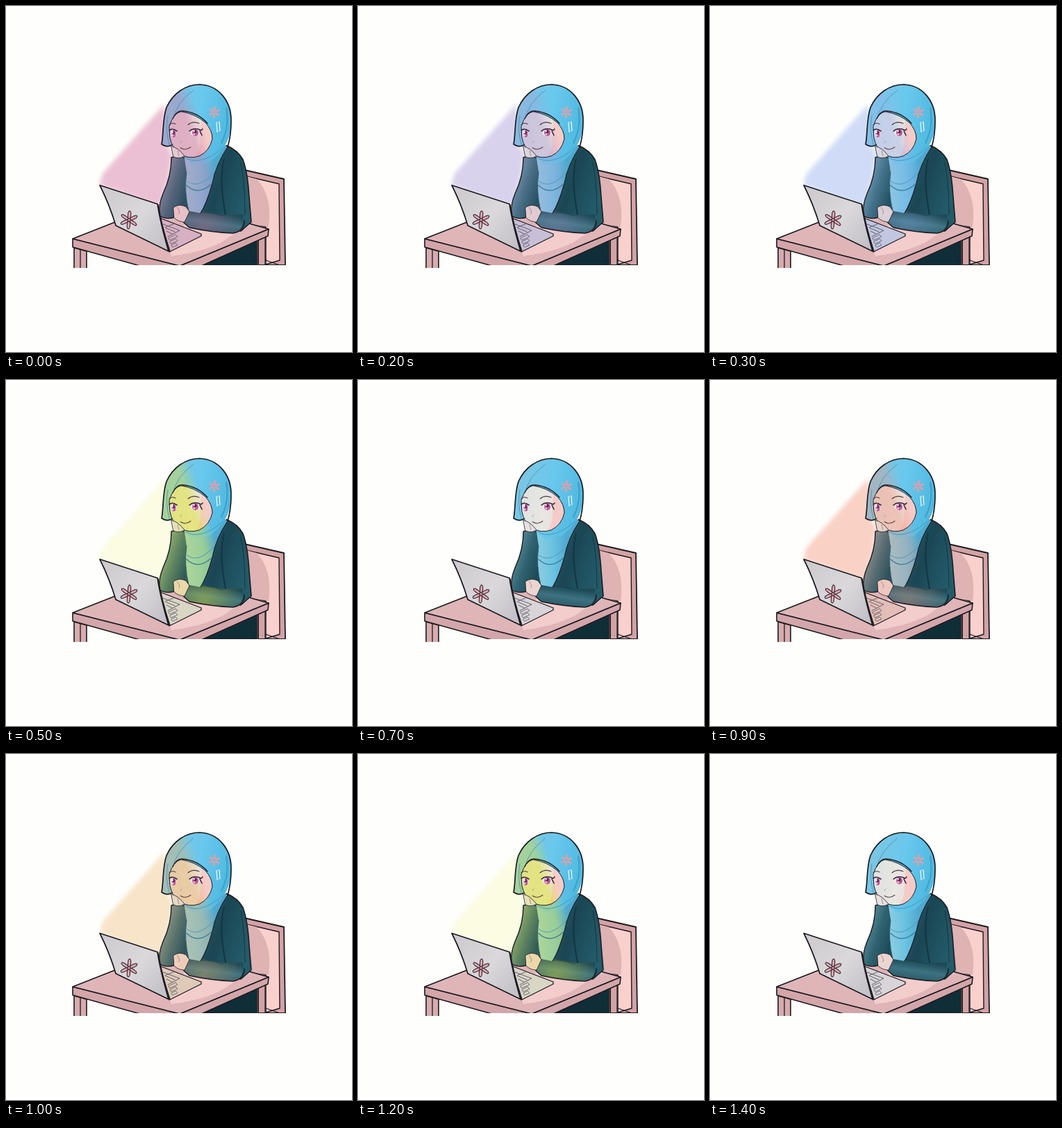
Write an HTML page with a canvas that moves like this. It is 498 by 498 pixels and loops after 1.5 s.

```html
<!DOCTYPE html>
<html lang="en">
<head>
<meta charset="utf-8">
<title>Studying by laptop light</title>
<style>
html, body { margin: 0; width: 100%; height: 100%; overflow: hidden; background: #fefffd; }
canvas { display: block; width: 498px; height: 498px; }
</style>
</head>
<body>
<canvas id="stage" width="498" height="498"></canvas>
<script>
const ctx = document.getElementById('stage').getContext('2d');
const PAPER = '#fefffd', INK = '#1b1a20';
const LOOP = 1500, STEP = 100;

// Screen light: [time, red, green, blue, strength in the air, strength on the figure]
const LIGHTS = [
  [0, 215, 112, 160, .44, .46],
  [300, 150, 176, 240, .44, .4],
  [500, 226, 226, 50, .13, .54],
  [700, 235, 228, 120, 0, 0],
  [900, 245, 150, 125, .44, .44],
  [1200, 226, 226, 50, .13, .54],
  [1400, 235, 228, 120, 0, 0],
  [1500, 215, 112, 160, .44, .46]
];

const shapes = {
  beam: 'M134 258L139 241L228 141L232 200L240 214L234 250L222 290Z',
  chair: 'M343 236L400 249L402 373H363V320L346 300Z',
  chairPanel: 'M346 245L393 256L394 366L374 372V318L352 312Z',
  chairShade: 'M346 245L361 249Q384 274 378 318L352 314Z',
  lap: 'M284 373L361 337V373Z',
  deskTop: 'M96 335L157 311L250 296L346 312L378 321L250 374Z',
  deskLight: 'M238 360Q298 352 322 332L354 314L262 304L236 354Z',
  deskLeft: 'M96 335L250 374V390L96 347Z',
  deskRight: 'M378 321L377 331L250 388V374Z',
  leg: 'M98 348L116 353V380H98Z',
  torso: 'M300 206L318 201Q334 208 341 221Q348 240 350 275L353 311L338 324L262 305L256 240Z',
  propArm: 'M238 218Q248 214 261 220Q266 240 262 268L261 300L243 304Q230 308 221 302Q219 287 226 270Q238 245 238 218Z',
  foreArm: 'M260 299Q272 292 288 296L314 301L341 300Q343 324 327 327Q297 326 264 319L256 312Z',
  chin: 'M238 202Q247 203 257 216Q249 221 241 217Z',
  hand: 'M241 290Q249 284 259 289L264 296L257 311Q248 311 242 305Z',
  drape: 'M256 212L306 195L319 203Q302 228 297 255Q289 284 280 298L263 295Q256 266 260 239Z',
  hood: 'M231 146C240 126 258 113 279 113C306 114 325 137 324 167C324 190 314 210 292 225L268 228L257 218L239 200Q231 204 224 199C227 184 225 163 231 146Z',
  face: 'M235 173Q241 154 252 152Q272 155 287 168Q297 179 297 191Q293 209 278 216Q264 221 249 213Q239 204 236 190Z',
  cheek: 'M281 165Q297 179 297 191Q293 209 278 216L272 218Q282 204 280 186Z',
  lid: 'M135 258L218 285Q222 312 234 353L158 316Q149 286 135 258Z',
  base: 'M221 305L281 328V331L235 354Z'
};
const paths = Object.fromEntries(Object.entries(shapes).map(([name, d]) => [name, new Path2D(d)]));

function shape(name, fill, width = 1.6) {
  ctx.fillStyle = fill;
  ctx.fill(paths[name]);
  if (width) line(paths[name], width);
}

function line(path, width = 1.2, color = INK) {
  ctx.lineWidth = width;
  ctx.strokeStyle = color;
  ctx.stroke(typeof path === 'string' ? new Path2D(path) : path);
}

function addStops(g, colors) {
  colors.forEach((c, i) => g.addColorStop(i / (colors.length - 1), c));
  return g;
}

function gradient(x0, y0, x1, y1, ...colors) {
  return addStops(ctx.createLinearGradient(x0, y0, x1, y1), colors);
}

function glow(x, y, radius, ...colors) {
  return addStops(ctx.createRadialGradient(x, y, 0, x, y, radius), colors);
}

function oval(x, y, rx, ry, fill) {
  ctx.fillStyle = fill;
  ctx.beginPath();
  ctx.ellipse(x, y, rx, ry, 0, 0, Math.PI * 2);
  ctx.fill();
}

function flower(x, y, radius, thin, color, outline) {
  for (let i = 0; i < 6; i++) {
    ctx.save();
    ctx.translate(x, y);
    ctx.rotate(i * Math.PI / 3 + .08);
    oval(0, -radius * .56, radius * thin, radius * .43, color);
    if (outline) {
      ctx.strokeStyle = outline;
      ctx.lineWidth = 1.2;
      ctx.stroke();
    }
    ctx.restore();
  }
}

function lightAt(time) {
  const next = LIGHTS.findIndex(l => l[0] > time);
  const a = LIGHTS[next - 1], b = LIGHTS[next];
  const p = (time - a[0]) / (b[0] - a[0]);
  const [, r, g, bl, air, body] = a.map((v, i) => v + (b[i] - v) * p);
  const tint = alpha => `rgba(${r | 0},${g | 0},${bl | 0},${alpha})`;
  // The lit side of the head ends along a slanted line
  const headTint = alpha => gradient(260, 163, 278, 157, tint(alpha), tint(0));
  return { tint, headTint, air, body };
}

function drawChair() {
  shape('chair', '#d3a2a4', 1.8);
  shape('chairPanel', '#f9d0cc', 1.4);
  shape('chairShade', '#dfb3b3', 0);
  line('M373 319V373M374 366L394 373', 1.3);
}

function drawDesk() {
  shape('lap', '#102e38');
  shape('leg', '#d8abae');
  line('M107 351V377', 1.3);
  shape('deskLeft', '#d3a6a9');
  shape('deskRight', '#d3a6a9');
  shape('deskTop', '#dfb5b8', 0);
  shape('deskLight', '#f3cccc', 0);
  line(paths.deskTop, 1.8);
}

function drawSleeves({ tint, body }) {
  shape('torso', gradient(265, 240, 350, 270, '#2d6070', '#1b4654', '#245b69'));
  line('M314 220Q306 250 316 300', 2, '#123642');
  line('M338 226Q344 257 344 300', 1, '#123642');

  shape('propArm', gradient(222, 255, 262, 268, '#5b8c97', '#2f6270', '#1e4a57'), 0);
  shape('propArm', gradient(222, 255, 260, 268, tint(body * .8), tint(body * .5), tint(body * .2)), 0);
  line('M261 220Q248 214 238 218Q238 245 226 270Q219 287 221 302Q230 308 243 304', 1.4);

  shape('foreArm', gradient(292, 297, 288, 325, '#1d4855', '#3d7280', '#2a5b68'), 0);
  shape('foreArm', glow(284, 320, 60, tint(body * .8), tint(body * .4), tint(0)), 0);
  line('M260 299L256 312L264 319Q297 326 327 327Q343 324 343 309', 1.5);
  line('M270 296Q288 295 312 302', .8, '#173b47');
}

function drawEye(x, y, width) {
  oval(x, y, width, 5.4, '#f6e6ee');
  oval(x + .5, y + .4, width * .68, 5, '#b45a92');
  oval(x + .5, y - 1, width * .32, 2.4, '#5a2a54');
  oval(x - 1, y + 2.6, 1.6, 1.4, '#f0bdd7');
  oval(x - 1.4, y - 2, 1.1, 1.3, '#fff');
}

function drawFace({ headTint, body }) {
  shape('face', gradient(240, 180, 297, 187, '#dfe3e1', '#e8e7e2', '#eedbd7'), 0);
  shape('cheek', '#f4cbc8', 0);
  shape('face', headTint(body), 1);
  drawEye(241, 183.5, 4.3);
  drawEye(272, 182, 6.5);
  line('M235 179Q239 175 246 180M264 180Q271 174 281 179L283 177M279 180L282 186', 1.6, '#35243a');
  line('M235 171Q239 167 244 170M262 171Q269 165 278 169', 1.1, '#4c3942');
  line('M251 204Q258 209 266 203', 1.1, '#654248');
  line('M253 194L251 197', .7, '#a68587');
}

function drawScarf(light) {
  const { headTint, body } = light;
  shape('drape', gradient(259, 250, 301, 248, '#8accdf', '#6bc3e2', '#50a9cf'), 0);
  shape('drape', headTint(body * .75), 0);
  line('M319 203Q302 228 297 255Q289 284 280 298', 1.1);
  line('M260 239Q256 266 263 295', .9, '#2b6078');

  shape('hood', gradient(229, 155, 323, 174, '#7cc6e2', '#69c8ed', '#4eb8e0'), 0);
  shape('hood', headTint(body * .75), 0);
  line('M319 203Q324 186 324 167C325 137 306 114 279 113C258 113 240 126 231 146C225 163 227 184 224 199Q231 204 239 200', 1.7);

  line('M240 164Q245 139 270 121M233 158Q229 178 235 199', .8, '#4b8cab');
  line('M259 219Q280 231 312 204M259 251Q276 266 299 240', .9, '#4c94b0');
  line('M260 258Q276 274 296 256', 1.2, '#3b7d98');
  line('M317 147Q322 174 310 197', 2, '#3e9fc7');
  drawFace(light);
  line('M240 162Q246 150 254 151Q276 153 290 169', 1.3);
  flower(300, 153, 9, .14, '#ee9ca4');
  line('M303 168L304 181M307 167L308 179', 1.3, '#e9f8fa');
  line('M304 181L308 179M303 168L307 167', .8, '#d0e7ed');
}

function drawHands({ tint, body }) {
  shape('chin', '#e6e2df', 0);
  shape('hand', '#ecd5d0', 0);
  for (const name of ['chin', 'hand']) shape(name, tint(body * .45), .8);
  line('M246 290Q251 294 249 299M247 208L249 216', .7, '#8b6868');
}

function drawLaptop({ tint, air }) {
  shape('base', '#d8d4d8', 0);
  shape('base', tint(air * .8), 1.3);
  line('M226 314L250 323L233 332M229 319L243 325M231 324L239 328M230 318L241 314', 1, '#62616a');
  for (let row = 0; row < 3; row++) {
    const x = 234 + row * 2, y = 334 + row * 5;
    line(`M${x} ${y}L${x + 10 - row * 2} ${y - 5 + row}L${x + 13 - row * 2} ${y - 2 + row}L${x + 2} ${y + 3}Z`, .9, '#67656e');
  }
  shape('lid', gradient(145, 270, 228, 345, '#cfccd0', '#dad8da', '#c3c1c7'), 1.7);
  line('M219 286Q224 316 236 353', 1.3);
  flower(177, 308, 13, .16, '#dcaab5', '#462c35');
}

function draw(time) {
  const light = lightAt(time);
  ctx.fillStyle = PAPER;
  ctx.fillRect(0, 0, 498, 498);
  ctx.save();
  ctx.beginPath();
  ctx.rect(90, 105, 320, 268);
  ctx.rect(90, 373, 28, 4);
  ctx.clip();
  ctx.lineJoin = ctx.lineCap = 'round';
  drawChair();
  drawDesk();
  ctx.filter = 'blur(3px)';
  shape('beam', light.tint(light.air), 0);
  ctx.filter = 'none';
  drawSleeves(light);
  drawScarf(light);
  drawHands(light);
  drawLaptop(light);
  ctx.restore();
}

function tick() {
  draw(Math.floor(performance.now() % LOOP / STEP) * STEP);
  requestAnimationFrame(tick);
}
tick();
</script>
</body>
</html>
```
